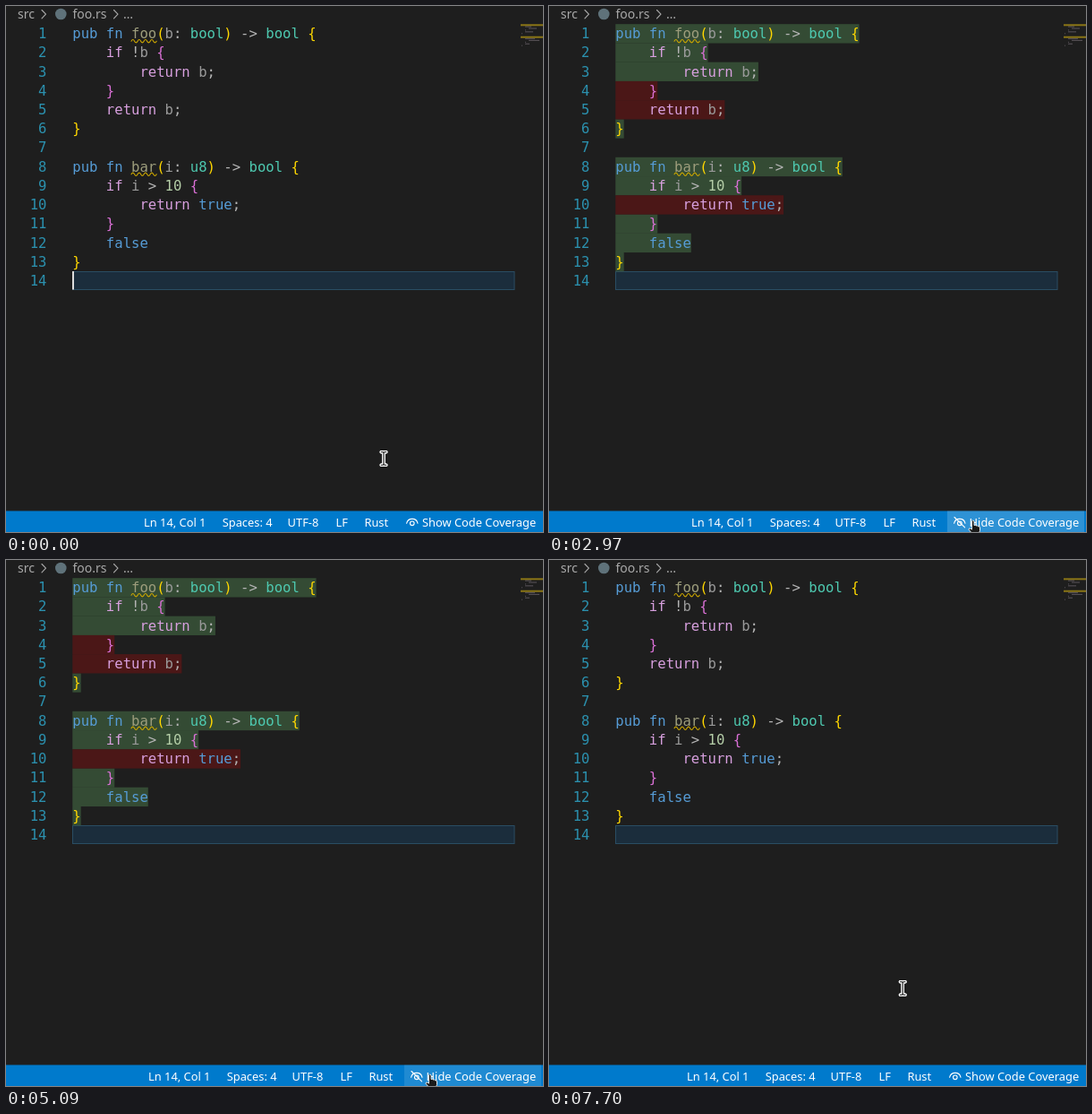
These frames come from a looping animation (600x587 px, 8.39 s). An HTML page:

```html
<!DOCTYPE html>
<html lang="en">
<meta charset="utf-8">
<title>Code coverage toggle</title>
<style>
  html, body { margin: 0; height: 100%; overflow: hidden; background: #1e1e1e; }
  svg { display: block; }
  text { white-space: pre; }
  .code { font: 15.6px "DejaVu Sans Mono", monospace; }
  .crumb { font: 14px "Noto Sans", sans-serif; fill: #a9a9a9; }
  .status { font: 12.86px "Noto Sans", sans-serif; fill: #fff; }
  .line { fill: none; stroke-linecap: round; stroke-linejoin: round; }
</style>
<svg width="600" height="587" viewBox="0 0 600 587">
  <rect width="600" height="587" fill="#1e1e1e"/>
  <text class="crumb" x="13" y="14">src</text>
  <circle cx="61.3" cy="9" r="6.3" fill="#5f727a"/>
  <text class="crumb" x="74.5" y="14">foo.rs</text>
  <text class="crumb" x="131" y="14">…</text>
  <path class="line" stroke="#a9a9a9" stroke-width="1.1" d="M40 4.5l4.5 4.7-4.5 4.7M120.5 4.5l4.5 4.7-4.5 4.7"/>

  <rect x="74.5" y="296.5" width="493.5" height="20" fill="#1b2d3c" stroke="#2a4d63"/>
  <g id="green" fill="#344b34"></g>
  <g id="red" fill="#4b1717"></g>
  <g id="code" class="code"></g>
  <g id="map"></g>
  <rect id="caret" x="74" y="296" width="2" height="20.5" fill="#dcdcdc"/>

  <rect y="563.5" width="600" height="24" fill="#007acc"/>
  <rect id="button" y="563.5" height="24" fill="#fff"/>
  <g id="items" class="status">
    <g class="line" stroke="#fff" stroke-width="1.1">
      <path d="M447.6 577.3c1.6-6.6 11-6.6 12.4 0"/>
      <circle cx="453.8" cy="577.3" r="2.3"/>
      <path id="slash" d="M448 570.5l11.6 11.4"/>
    </g>
  </g>
  <text id="label" class="status" x="592.2" y="580.5" text-anchor="end"></text>

  <g id="beam" class="line">
    <path id="stem" stroke="#fff" stroke-width="3.4" d="M-2.8-7.3h1.8l1 1 1-1h1.8M0-6.3V6.3M-2.8 7.3h1.8l1-1 1 1h1.8"/>
    <use href="#stem"/>
    <path stroke="#111" stroke-width="1.1" d="M-2.8-7.3h1.8l1 1 1-1h1.8M0-6.3V6.3M-2.8 7.3h1.8l1-1 1 1h1.8"/>
  </g>
  <path id="hand" fill="#1a1a1a" stroke="#fff" stroke-width=".9" stroke-linejoin="round"
    d="M-1.3 0Q0-2 1.3 0V4.6Q2.7 3.5 3.6 5Q5 4.2 5.8 5.8Q7.6 5.2 7.8 7V10.5L6.4 14H-.6L-4.6 9.4Q-4.6 7.4-2.8 8L-1.3 9.2Z"/>
</svg>
<script>
const $ = id => document.getElementById(id);
const LOOP = 8390, LEFT = 74.3, TOP = 20.2, ROW = 21.23, COL = 9.39;

const lines = `pub fn foo(b: bool) -> bool {
    if !b {
        return b;
    }
    return b;
}

pub fn bar(i: u8) -> bool {
    if i > 10 {
        return true;
    }
    false
}
`.split('\n');
const missed = [4, 5, 10];

const rules = [
  [/^(pub|fn|true|false)$/, '#569cd6'],
  [/^(if|return)$/, '#d8a0df'],
  [/^(bool|u8)$/, '#4ec9b0'],
  [/^(foo|bar)$/, '#9d9d7c'],
  [/^\d+$/, '#b5cea8'],
  [/^[bi]$/, '#9a9a9a'],
];

function paint(line) {
  return line.replace(/\w+|[(){}]|[^\w(){}]+/g, part => {
    const rule = rules.find(([test]) => test.test(part));
    const bracket = line[0] === ' ' ? '#da70d6' : '#ffd700';
    const color = rule ? rule[1] : /[(){}]/.test(part) ? bracket : '#b4b4b4';
    return `<tspan fill="${color}">${part.replace('>', '&gt;')}</tspan>`;
  });
}

function add(id, markup) {
  $(id).insertAdjacentHTML('beforeend', markup);
}

lines.forEach((line, i) => {
  const y = TOP + i * ROW, base = y + 15.9;
  add('code', `<text x="45.5" y="${base}" text-anchor="end" fill="#2b91af">${i + 1}</text>
    <text x="${LEFT}" y="${base}">${paint(line)}</text>`);
  if (!line) return;

  add(missed.includes(i + 1) ? 'red' : 'green',
    `<rect x="${LEFT}" y="${y}" width="${line.length * COL}" height="${ROW + .1}"/>`);

  const mapY = 20.3 + i * 1.92, indent = line.search(/\S/);
  if (line.startsWith('pub')) {
    add('code', `<path class="line" stroke="#cca700" stroke-width="1.1"
      d="M${LEFT + 7 * COL} ${y + 19}q1.76-3.4 3.52 0${'t3.52 0'.repeat(7)}"/>`);
    add('map', `<rect x="575" y="${mapY}" width="25" height="2" fill="#8a7516"/>`);
  } else {
    add('map', `<rect x="${576 + indent}" y="${mapY + .3}" width="${line.length - indent}"
      height="1.1" fill="#a89aa8" opacity=".4"/>`);
  }
});

const items = [[154, 'Ln 14, Col 1'], [241.7, 'Spaces: 4'], [314.6, 'UTF-8'], [368.6, 'LF'], [400.4, 'Rust']];
for (const [x, text] of items) add('items', `<text x="${x}" y="580.5">${text}</text>`);

const show = (id, on) => $(id).setAttribute('display', on ? 'inline' : 'none');
const within = (t, ...spans) => spans.some(([from, to]) => t >= from && t < to);
const progress = (t, from, to) => Math.min(1, Math.max(0, (t - from) / (to - from)));
const mix = (a, b, p) => a.map((v, i) => v + (b[i] - v) * p);

function pointer(t) {
  const start = [422, 505], button = [473.7, 575], end = [395.2, 478];
  if (t < 6910) {
    const p = progress(t, 400, 970);
    return mix(start, button, p * p * (3 - 2 * p));
  }
  return mix(button, end, 1 - (1 - progress(t, 6920, 7700)) ** 1.6);
}

function draw(t) {
  const hide = within(t, [1210, 3090], [5000, 6610]);
  const pressed = within(t, [1090, 1210], [2970, 3090], [4820, 5000], [6420, 6610]);
  const shift = hide ? 5 : 0;
  show('caret', within(t, [0, 450], [950, 1090]));
  show('green', within(t, [1270, 3150], [5060, 6670]));
  show('red', within(t, [1300, 3180], [5090, 6700]));
  show('slash', hide);
  $('label').textContent = (hide ? 'Hide' : 'Show') + ' Code Coverage';
  $('items').setAttribute('transform', `translate(${shift})`);

  const [x, y] = pointer(t), over = y > 563.5;
  const button = $('button');
  button.setAttribute('x', 440 + shift);
  button.setAttribute('width', 158 - shift);
  button.setAttribute('opacity', pressed ? .18 : .12);
  show('button', over);
  show('hand', over);
  show('beam', !over);
  $(over ? 'hand' : 'beam').setAttribute('transform', `translate(${x} ${y})`);
}

const begin = performance.now();
function tick() {
  draw((performance.now() - begin) % LOOP);
  requestAnimationFrame(tick);
}
tick();
</script>
</html>
```
